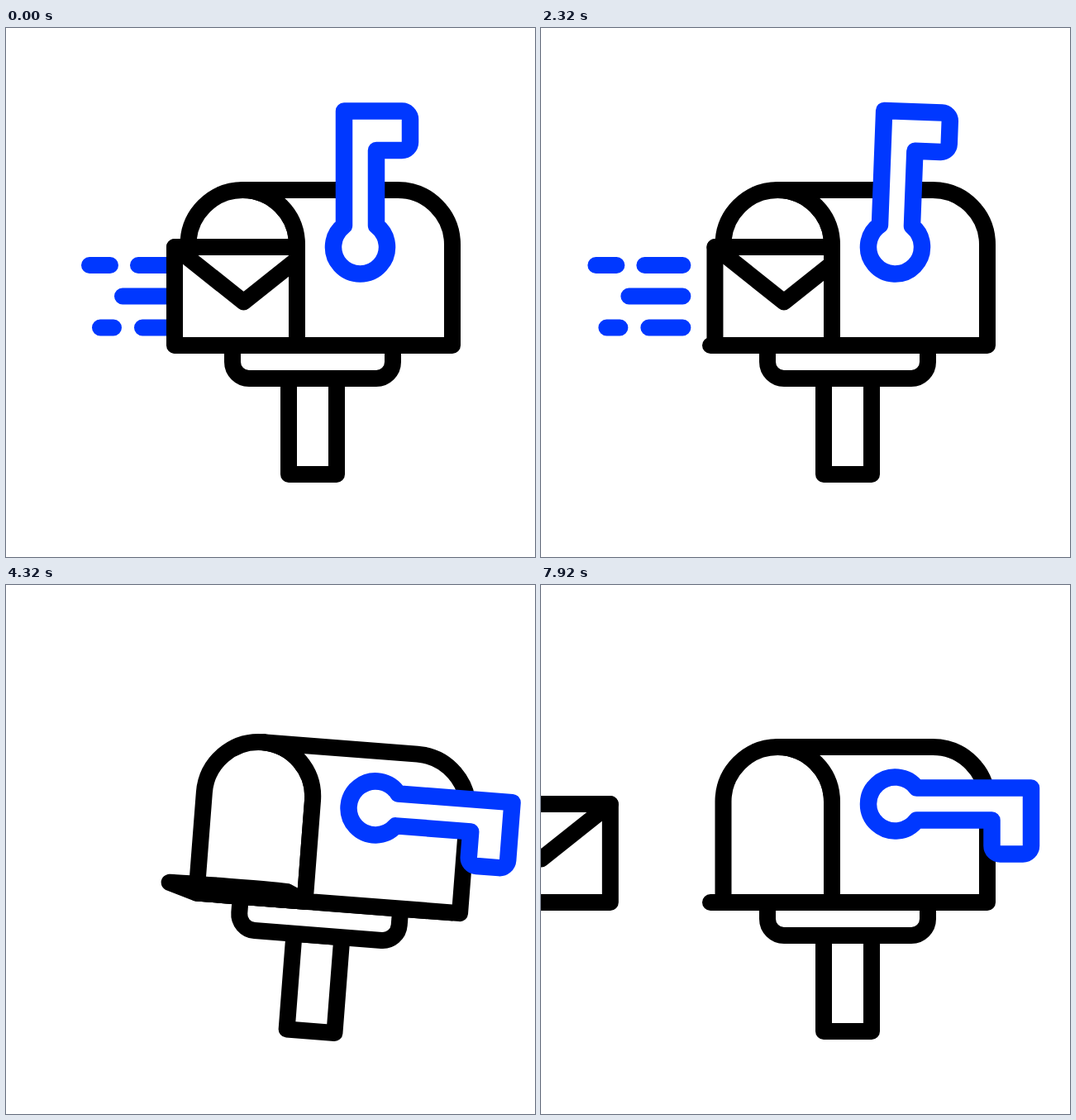
An HTML page for the animation above (8 s loop, 640 by 640 pixels).

```html
<!DOCTYPE html>
<html lang="en">
<head>
<meta charset="utf-8">
<title>Mailbox</title>
<style>
  html, body { margin: 0; width: 100%; height: 100%; overflow: hidden; background: #fff; }
  svg { display: block; width: 100vw; height: 100vh; }
  path { fill: #fff; stroke: #000; stroke-width: 20; stroke-linecap: round; stroke-linejoin: round; }
  .open { fill: none; }
  .blue { stroke: #0038ff; }
  #flag { stroke-width: 20.5; }
</style>
</head>
<body>
<svg viewBox="0 0 640 640">
  <g id="box">
    <path d="M342 424H400V540H342Z"/>
    <path d="M274 384V404A20 20 0 0 0 294 424H448A20 20 0 0 0 468 404V384"/>
    <path d="M220.5 384V262A66 66 0 0 1 286.5 196A66 66 0 0 1 352 262V384Z"/>
    <path id="trail" class="open blue" d="M10 287H35M69 287H115M50 324.5H115M23 362.5H39M74 362.5H115"/>
    <g id="letter">
      <path d="M0 265H167V384H0Z"/>
      <path class="open" d="M0 265L83.5 331.5L167 265"/>
    </g>
    <path d="M286.5 196A66 66 0 0 1 352 262V384H540V262A66 66 0 0 0 474 196Z"/>
    <path class="open" d="M220.5 384H352"/>
    <path id="door"/>
    <path id="flag" class="blue" d="M409 239V100.5H479A10 10 0 0 1 489 110.5V138A10 10 0 0 1 479 148H448V239A32.5 32.5 0 1 1 409 239Z"/>
  </g>
</svg>
<script>
const LOOP = 8000;
const TURN = 1540;    // the letter stops backing off and shoots in
const LEAN = 3820;    // the box leans furthest
const ENTER = 7650;   // the next letter appears

const $ = id => document.getElementById(id);
const mix = (a, b, k) => a + (b - a) * k;
const span = (t, from, to) => Math.min(Math.max((t - from) / (to - from), 0), 1);
const swing = (t, from, to) => (1 - Math.cos(Math.PI * span(t, from, to))) / 2;
const launch = (t, from, to) => span(t, from, to) ** 1.8;

const tilt = t => 7.5 * (swing(t, 2380, LEAN) - swing(t, LEAN, 4950));
const flagTurn = t => 90 * swing(t, 2160, 3790);
const trailX = t => 91 - 83 * swing(t, 0, TURN) + 357 * launch(t, TURN + 20, 3870);
const letterX = t => t < ENTER
  ? 204 - 74 * swing(t, 0, TURN) + 233 * launch(t, TURN, 2950)
  : mix(-190, -52, span(t, ENTER, LOOP));
// 0 closed, 1 leaning furthest out, 2 lying flat
const doorOpen = t => 2 * (1 - swing(t, LEAN, 5930) + swing(t, 6205, 7160));

function doorPath(f) {
  const s = 84 * Math.min(f, 1), k = Math.max(f - 1, 0);
  const left = mix(220.5 - s, 205, k), right = mix(352 - s, 352, k);
  const side = mix(262 + s, 384, k);
  const h = (66 - 0.75 * s) * (1 - k), top = side - h;
  const mid = (left + right) / 2, w = (right - left) * 0.276;
  const lean = s * (1 - k), rise = side - 0.55 * h;
  return `M220.5 384L${left} ${side}`
    + `C${left - 0.05 * lean} ${rise} ${mid - w} ${top} ${mid} ${top}`
    + `C${mid + w} ${top} ${right - 0.12 * lean} ${rise} ${right} ${side}`
    + 'L352 384Z';
}

function draw(t) {
  $('box').setAttribute('transform', `rotate(${tilt(t)} 374 508)`);
  $('flag').setAttribute('transform', `rotate(${flagTurn(t)} 428.5 265)`);
  $('trail').setAttribute('transform', `translate(${trailX(t)})`);
  $('letter').setAttribute('transform', `translate(${letterX(t)})`);
  $('door').setAttribute('d', doorPath(doorOpen(t)));
}

const start = performance.now();
function tick() {
  draw((performance.now() - start) % LOOP);
  requestAnimationFrame(tick);
}
tick();
</script>
</body>
</html>
```
